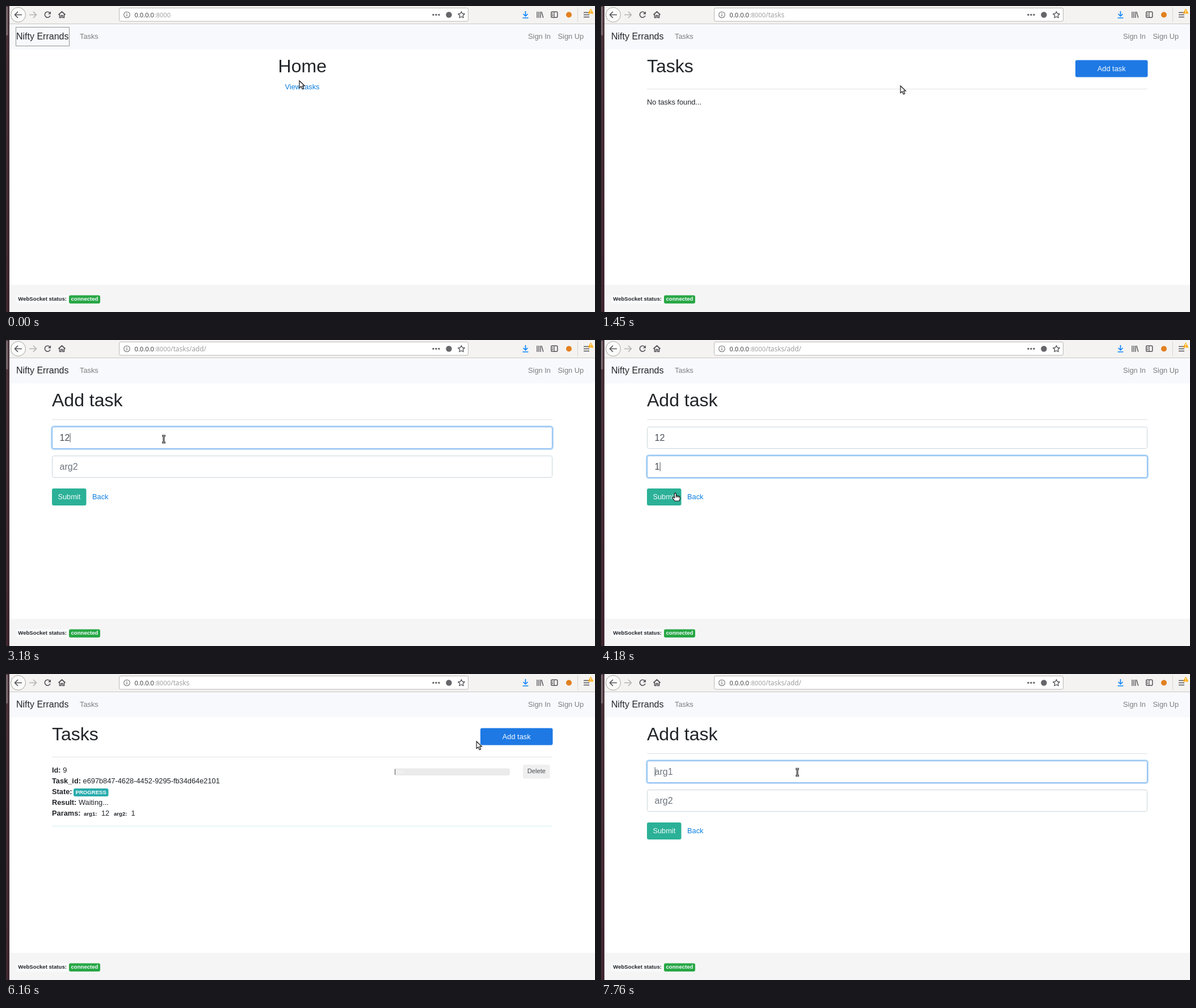
These frames come from a looping animation (1038x540 px, 8 s). An HTML page:

```html
<!DOCTYPE html>
<html lang="en">
<head>
<meta charset="utf-8">
<title>Task list demo</title>
<style>
html, body { margin: 0; width: 100%; height: 100%; overflow: hidden; background: #fff; }
svg { display: block; }
text { font: 12.8px "Liberation Sans", Arial, sans-serif; fill: #212529; white-space: pre; }
.h1 { font-size: 32px; }
.brand { font-size: 16px; }
.nav { fill: #7d7e80; }
.link { fill: #0c7fe2; }
.mid { text-anchor: middle; }
.b { font-weight: bold; }
.tag { font-size: 9.6px; font-weight: bold; }
.light { fill: #f4fbff; }
.field { font-size: 16px; fill: #495057; }
.hint { fill: #6c757d; }
.url, .url text { font-family: "Open Sans", "Noto Sans", sans-serif; font-size: 11.2px; fill: #999; }
.url .path, text.path { font: 11.9px "Open Sans", "Noto Sans", sans-serif; fill: #999; }
.tip text { font: 11.2px "Open Sans", "Noto Sans", sans-serif; fill: #444; }
.icon { fill: none; stroke: #55555a; stroke-width: 1.7; stroke-linejoin: round; }

/* Everything runs on one 8 s clock; 1% is 80 ms. */
.a { animation: 8s step-end infinite; }
.home { animation-name: home; }
.tasks { animation-name: tasks; }
.empty { animation-name: empty; }
.row { animation-name: row; }
.add { animation-name: add; }
@keyframes home { 0% { opacity: 1 } 13.75%, 100% { opacity: 0 } }
@keyframes tasks { 0%, 26.75%, 87.5%, 100% { opacity: 0 } 13.75%, 62.5% { opacity: 1 } }
@keyframes empty { 0%, 26.75%, 100% { opacity: 0 } 13.75% { opacity: 1 } }
@keyframes row { 0%, 87.5%, 100% { opacity: 0 } 62.5% { opacity: 1 } }
@keyframes add { 0%, 62.5% { opacity: 0 } 26.75%, 87.5%, 100% { opacity: 1 } }

.brand-ring { animation-name: brand-ring; }
.link-ring { animation-name: link-ring; }
.link-line { animation-name: link-line; }
.link-text { animation-name: link-text; }
@keyframes brand-ring { 0% { opacity: 1 } 10.25%, 100% { opacity: 0 } }
@keyframes link-ring { 0%, 13.75%, 100% { opacity: 0 } 10.25% { opacity: 1 } }
@keyframes link-line { 0%, 13.75%, 100% { opacity: 0 } 5% { opacity: 1 } }
@keyframes link-text { 0%, 100% { fill: #0c7fe2 } 5% { fill: #0056b3 } }

.tip-home { animation-name: tip-home; }
.tip-add { animation-name: tip-add; }
@keyframes tip-home { 0%, 14.125%, 100% { opacity: 0 } 6% { opacity: 1 } }
@keyframes tip-add { 0%, 28.75%, 88.5%, 100% { opacity: 0 } 25%, 82% { opacity: 1 } }

.add-btn { fill: #1e79e4; animation: add-btn 8s linear infinite; }
@keyframes add-btn {
  0%, 23.75%, 26.8%, 78.25%, 87.6%, 100% { fill: #1e79e4 }
  25.6%, 26.75%, 80.1%, 87.5% { fill: #0a69d6 }
}
.submit { fill: #2bb197; animation: submit 8s linear infinite; }
@keyframes submit { 0%, 52.375%, 62.6%, 100% { fill: #2bb197 } 54.25%, 62.5% { fill: #23977f } }
.submit-ring { animation-name: submit-ring; }
@keyframes submit-ring { 0%, 62.5%, 100% { opacity: 0 } 61.25% { opacity: 1 } }
.bar { animation-name: bar; }
@keyframes bar { 0%, 100% { width: 1.2px } 82.5% { width: 2.2px } }

.focus1 { animation-name: focus1; }
.focus2 { animation-name: focus2; }
.hint1 { animation-name: hint1; }
.hint2 { animation-name: hint2; }
.digit1 { animation-name: digit1; }
.digit2 { animation-name: digit2; }
.digit3 { animation-name: digit3; }
.caret1 { animation-name: caret1; }
.caret2 { animation-name: caret2; }
@keyframes focus1 { 0%, 43.5% { opacity: 0 } 32.75%, 96%, 100% { opacity: 1 } }
@keyframes focus2 { 0%, 61.25%, 100% { opacity: 0 } 43.5% { opacity: 1 } }
@keyframes hint1 { 0%, 70%, 100% { opacity: 1 } 34.75% { opacity: 0 } }
@keyframes hint2 { 0%, 70%, 100% { opacity: 1 } 51% { opacity: 0 } }
@keyframes digit1 { 0%, 70%, 100% { opacity: 0 } 34.75% { opacity: 1 } }
@keyframes digit2 { 0%, 70%, 100% { opacity: 0 } 37.75% { opacity: 1 } }
@keyframes digit3 { 0%, 70%, 100% { opacity: 0 } 51% { opacity: 1 } }
@keyframes caret1 {
  0%, 70%, 100% { transform: none }
  34.75% { transform: translateX(8.9px) }
  37.75% { transform: translateX(17.8px) }
}
@keyframes caret2 {
  0%, 100% { transform: none; opacity: 1 }
  51% { transform: translateX(8.9px); opacity: 1 }
  58.625% { transform: translateX(8.9px); opacity: 0 }
}

.cursor { animation: move 8s linear infinite; }
@keyframes move {
  0% { transform: translate(517px, 132px) }
  2% { transform: translate(519px, 122px) }
  5% { transform: translate(522px, 134px) }
  7.375%, 18% { transform: translate(524px, 141px) }
  18.125% { transform: translate(527px, 141px) }
  20% { transform: translate(640px, 128px) }
  21.875% { transform: translate(800px, 117px) }
  23.75% { transform: translate(862px, 115px) }
  25%, 27.75% { transform: translate(871px, 113px) }
  28.25% { transform: translate(720px, 118px) }
  29.25% { transform: translate(340px, 139px) }
  30.25%, 32.125% { transform: translate(290px, 168px) }
  36%, 40.5% { transform: translate(278px, 175px) }
  41.75% { transform: translate(275px, 212px) }
  42.75%, 44% { transform: translate(273px, 225px) }
  46.25% { transform: translate(235px, 243px) }
  49.375% { transform: translate(165px, 262px) }
  52.25% { transform: translate(131px, 270px) }
  54.25%, 70.875% { transform: translate(118px, 276px) }
  71.375% { transform: translate(130px, 280px) }
  72.5% { transform: translate(260px, 250px) }
  75% { transform: translate(660px, 165px) }
  77% { transform: translate(829px, 119px) }
  80.75%, 89.5% { transform: translate(886px, 110px) }
  92.5% { transform: translate(560px, 140px) }
  95.375% { transform: translate(350px, 172px) }
  96.25%, 100% { transform: translate(346px, 173.5px) }
}
.arrow { animation-name: arrow; }
.hand { animation-name: hand; }
.beam { animation-name: beam; }
@keyframes arrow {
  0%, 14.375%, 27%, 46.25%, 62.875%, 87.75% { opacity: 1 }
  5%, 23.75%, 29.875%, 52%, 78.25%, 95%, 100% { opacity: 0 }
}
@keyframes hand {
  0%, 14.375%, 27%, 62.875%, 87.75%, 100% { opacity: 0 }
  5%, 23.75%, 52%, 78.25% { opacity: 1 }
}
@keyframes beam { 0%, 46.25% { opacity: 0 } 29.875%, 95%, 100% { opacity: 1 } }
</style>
</head>
<body>
<svg width="1038" height="540" viewBox="0 0 1038 540">
  <defs>
    <linearGradient id="desk" x2="0" y2="1">
      <stop offset="0" stop-color="#4b333b"/>
      <stop offset="1" stop-color="#40272f"/>
    </linearGradient>
    <rect id="box" x="81.5" width="881" height="38" rx="3"/>
    <g id="glow" fill="none">
      <use href="#box" stroke="#b5d9f8" stroke-width="5"/>
      <use href="#box" fill="#fff" stroke="#80b4ec"/>
    </g>
  </defs>

  <rect width="1038" height="540" fill="#fff"/>
  <rect width="6" height="540" fill="url(#desk)"/>
  <rect width="3.5" height="51" y="1" rx="1.5" fill="#75636a"/>
  <rect x="5" width="1" height="540" fill="#33222a"/>

  <!-- browser bar -->
  <rect x="6" width="1032" height="31" fill="#f4f3f1"/>
  <rect x="6" y="31" width="1032" height="1" fill="#cbc8c5"/>
  <g class="icon">
    <circle cx="21.5" cy="15.5" r="13" fill="#fbfbfa" stroke="#a5a3a1" stroke-width="1"/>
    <path d="M28 15.5H16M21 10l-5.5 5.5L21 21"/>
    <path d="M41 15.5h12M48 10l5.5 5.5L48 21" stroke="#b5b4b2"/>
    <path d="M77.3 12.2A5 5 0 1 0 78 17"/>
    <path d="M79 9.5v5h-5z" fill="#55555a" stroke="none"/>
    <path d="M92.5 15.5l6-5.5 6 5.5M94.5 15v5.5h2.7v-4h2.6v4h2.7V15"/>
    <rect x="199.5" y="3.5" width="615" height="23.5" rx="2.5" fill="#fff" stroke="#bab7b4" stroke-width="1"/>
    <circle cx="213" cy="15.5" r="5.3" stroke="#77777a" stroke-width="1.1"/>
    <path d="M213 14.5v4M213 12v1.4" stroke="#77777a" stroke-width="1.3"/>
    <path d="M802.5 9.8l1.8 3.7 4 .5-3 2.8.8 4-3.6-2-3.6 2 .8-4-3-2.8 4-.5z" stroke-width="1.3"/>
    <path d="M915.5 9v8.5M911.5 14l4 4 4-4M910.5 21h10" stroke="#0a84ff"/>
    <path d="M936 10v11M939 10v11M942 10v11M943.8 10.3l3 10.5" stroke-width="1.4"/>
    <rect x="960.8" y="10.3" width="11" height="10" rx="1.5" stroke-width="1.5"/>
    <path d="M966.2 10.5v9.6M962.3 13h2.4M962.3 15.2h2.4M962.3 17.4h2.4" stroke-width="1.1"/>
    <path d="M1007.5 2v26" stroke="#d7d4d1" stroke-width="1"/>
    <path d="M1018 11.5h10M1018 15.5h10M1018 19.5h10" stroke-width="1.6"/>
  </g>
  <g fill="#66666a">
    <circle cx="753" cy="15.5" r="1.7"/>
    <circle cx="758" cy="15.5" r="1.7"/>
    <circle cx="763" cy="15.5" r="1.7"/>
    <circle cx="780.5" cy="15.5" r="5.2"/>
  </g>
  <circle cx="992" cy="15.5" r="5" fill="#e2801f"/>
  <path d="M1030.500 5l4.300 8h-8.600z" fill="#ffad14" stroke="#ffad14" stroke-linejoin="round"/>
  <path d="M1030.500 7v3.300M1030.500 11.300v1.300" stroke="#fff" stroke-width="1.2"/>
  <g class="url">
    <text x="226.500" y="19.500" style="fill:#333">0.0.0.0</text>
    <text x="261.500" y="19.500">:8000</text>
  </g>

  <!-- site header and footer -->
  <rect x="6" y="32" width="1032" height="44.500" fill="#f8f9fc"/>
  <text class="brand" x="18" y="59">Nifty Errands</text>
  <rect class="a brand-ring" x="17.500" y="37.500" width="94" height="33" fill="none" stroke="#333" stroke-dasharray="1 1"/>
  <text class="nav" x="130" y="58">Tasks</text>
  <text class="nav" x="920" y="58">Sign In</text>
  <text class="nav" x="972.500" y="58">Sign Up</text>
  <rect x="6" y="492" width="1032" height="48" fill="#f5f5f5"/>
  <rect x="18" y="510" width="92" height="15" rx="3" fill="#f9fafb"/>
  <text class="tag" x="21.300" y="520">WebSocket status:</text>
  <rect x="111" y="510.500" width="55" height="14.500" rx="3" fill="#28a745"/>
  <text class="tag light mid" x="138.500" y="520">connected</text>

  <g class="a home">
    <text class="h1 mid" x="522.300" y="117">Home</text>
    <text class="link mid a link-text" x="522" y="147">View tasks</text>
    <path class="a link-line" d="M491.500 148.500h61" stroke="#0056b3"/>
    <rect class="a link-ring" x="490.500" y="134.500" width="62" height="15" fill="none" stroke="#0056b3" stroke-dasharray="1 1"/>
  </g>

  <g class="a tasks">
    <text class="path" x="290.300" y="19.500">/tasks</text>
    <text class="h1" x="81" y="117">Tasks</text>
    <rect class="add-btn" x="836" y="95.500" width="127.500" height="30" rx="3"/>
    <text class="light mid" x="899.700" y="115">Add task</text>
    <path d="M81 146.500h882" stroke="#e3e4e5"/>
  </g>
  <text class="a empty" x="81" y="173.500">No tasks found...</text>

  <g class="a row">
    <text x="81" y="173.500"><tspan class="b">Id:</tspan> 9</text>
    <text x="81" y="192.500"><tspan class="b">Task_id:</tspan> e697b847-4628-4452-9295-fb34d64e2101</text>
    <text class="b" x="81" y="211.500">State:</text>
    <rect x="119" y="202" width="61.500" height="14" rx="3" fill="#29abab"/>
    <text class="tag light mid" x="149.700" y="212">PROGRESS</text>
    <text x="81" y="231"><tspan class="b">Result:</tspan> Waiting...</text>
    <text class="b" x="81" y="250">Params:</text>
    <text class="tag" x="137" y="250">arg1:</text>
    <text x="168" y="250">12</text>
    <text class="tag" x="190" y="250">arg2:</text>
    <text x="220.500" y="250">1</text>
    <path d="M81 268.500h882" stroke="#d3eff3"/>
    <rect x="685" y="166.500" width="203" height="12.500" rx="3" fill="#ebebeb"/>
    <rect class="a bar" x="685" y="167.500" width="1.200" height="10.500" fill="#6a6f75"/>
    <text x="687" y="176" style="font-size:9.600px;fill:#f8f8f8">0%</text>
    <rect x="911" y="160" width="47.500" height="24.500" rx="2.500" fill="#efefef"/>
    <text class="mid" x="934.800" y="175" style="font-size:11.200px;fill:#484c50">Delete</text>
  </g>

  <g class="a add">
    <text class="path" x="290.300" y="19.500">/tasks/add/</text>
    <text class="h1" x="81" y="117">Add task</text>
    <path d="M81 140.500h882" stroke="#dfe1e2"/>
    <g fill="#fff" stroke="#c9d5da">
      <use href="#box" y="153.500"/>
      <use href="#box" y="204.500"/>
    </g>
    <g class="a focus1">
      <use href="#glow" y="153.500"/>
      <path class="a caret1" d="M95.200 164.500v16" stroke="#495057"/>
    </g>
    <g class="a focus2">
      <use href="#glow" y="204.500"/>
      <path class="a caret2" d="M95.200 215.500v16" stroke="#495057"/>
    </g>
    <text class="field hint a hint1" x="94.500" y="178">arg1</text>
    <text class="field a digit1" x="94.500" y="178">1</text>
    <text class="field a digit2" x="103.400" y="178">2</text>
    <text class="field hint a hint2" x="94.500" y="229">arg2</text>
    <text class="field a digit3" x="94.500" y="229">1</text>
    <rect class="a submit-ring" x="79.700" y="260.700" width="63" height="32.600" rx="4" fill="none" stroke="#b2e2d7" stroke-width="2.600"/>
    <rect class="submit" x="81" y="262" width="60.500" height="30" rx="3"/>
    <text class="light mid" x="111.300" y="281">Submit</text>
    <text class="link" x="152" y="281">Back</text>
  </g>

  <!-- link address shown while hovering -->
  <g class="tip">
    <g class="a tip-home">
      <path d="M6 521.500h111.500q3 0 3 3V540H6z" fill="#f4f3f2" stroke="#c9c7c5"/>
      <text x="9" y="535">0.0.0.0:8000/tasks</text>
    </g>
    <g class="a tip-add">
      <path d="M6 521.500h139.500q3 0 3 3V540H6z" fill="#f4f3f2" stroke="#c9c7c5"/>
      <text x="9" y="535">0.0.0.0:8000/tasks/add/</text>
    </g>
  </g>

  <g class="cursor">
    <path class="a arrow" d="M0 0V12.500L3 9.900L5.200 14.800L7.500 13.800L5.400 9H9.200Z" fill="#fff" stroke="#111" stroke-width="1.200"/>
    <g class="a hand" stroke="#111" stroke-linejoin="round" stroke-width="1.200">
      <path d="M-1.500 1.200Q0 -.8 1.500 1.200V5Q3 4 4 5.300Q5.500 4.600 6.300 6Q8.300 5.700 8.300 7.500V10.500L6.800 14H-1L-5 8.800Q-5 6.600-3 7.300L-1.500 8.800Z" fill="#fff"/>
      <path d="M1.500 5v3M4 5.500V8M6.300 6.200V8" fill="none"/>
    </g>
    <g class="a beam" fill="none">
      <path d="M-3 -6H3M-3 6H3M0 -6V6" stroke="#222" stroke-width="3"/>
      <path d="M-2.500 -6H2.500M-2.500 6H2.500M0 -6V6" stroke="#ddd" stroke-width=".9"/>
    </g>
  </g>
</svg>
</body>
</html>
```
